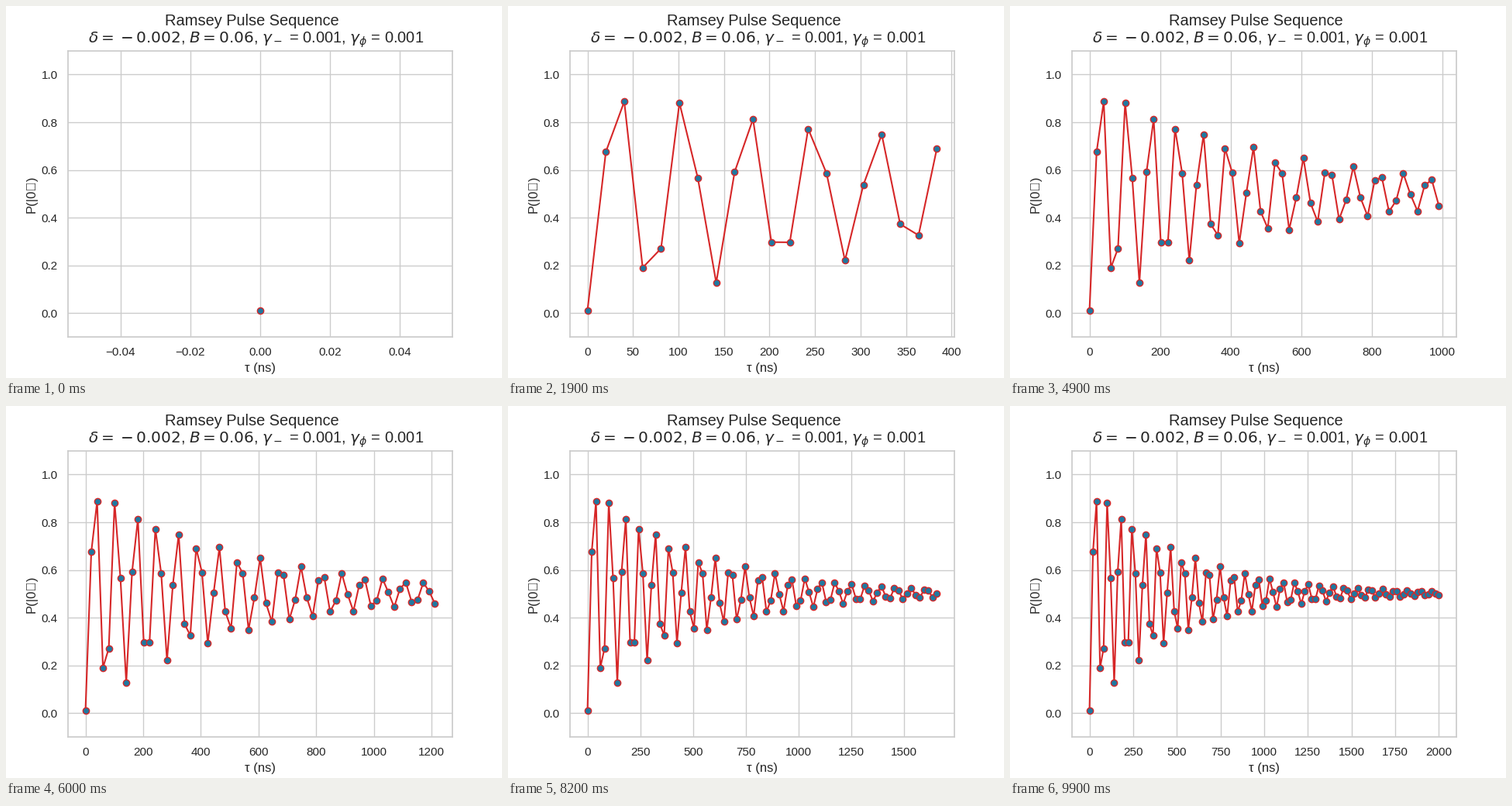
A matplotlib script that plays this animation: 640 by 480 pixels, repeating every 10 s.

```python
import numpy as np
import matplotlib.pyplot as plt
from matplotlib.animation import FuncAnimation

GRID, INK = "0.8", "0.15"

plt.rcParams.update({
    "font.family": "sans-serif",
    "font.sans-serif": ["Liberation Sans", "DejaVu Sans"],
    "font.size": 12,
    "figure.titlesize": 14.4,
    "text.color": INK,
    "axes.labelcolor": INK,
    "axes.labelsize": 12,
    "axes.edgecolor": GRID,
    "axes.linewidth": 1.25,
    "axes.axisbelow": True,
    "axes.grid": True,
    "grid.color": GRID,
    "grid.linewidth": 1,
    "lines.solid_capstyle": "round",
    "mathtext.fontset": "dejavusans",
})
for axis, side in (("xtick", "bottom"), ("ytick", "left")):
    plt.rcParams.update({
        f"{axis}.{side}": False,
        f"{axis}.color": INK,
        f"{axis}.labelsize": 11,
        f"{axis}.major.size": 6,
        f"{axis}.major.pad": 3.5,
    })

STEPS = 100
tau = np.linspace(0, 2000, STEPS)
# Damped Ramsey fringes around one half
prob = 0.5025 - 0.4975 * np.exp(-0.002 * tau) * np.cos(0.088 * tau + 0.165)

fig, ax = plt.subplots(figsize=(6.4, 4.8), dpi=100)
fig.suptitle(
    "Ramsey Pulse Sequence \n"
    r" $\delta = \hspace{0.2}{-}\hspace{0.2}0.002$, $B = 0.06$, "
    r"$\gamma_-$ = 0.001, $\gamma_\phi$ = 0.001"
)
ax.set_xlabel("τ (ns)")
ax.set_ylabel("P(|0⟩)")
ax.set_ylim(-0.1, 1.1)
line, = ax.plot([], [], "o-", color="tab:red", lw=1.5, ms=6, mew=1,
                mfc="#2078a0")


def update(i):
    line.set_data(tau[:i + 1], prob[:i + 1])
    ax.relim()
    ax.autoscale_view(scaley=False)
    return line,


anim = FuncAnimation(fig, update, frames=STEPS, interval=100,
                     repeat=True, repeat_delay=0)
plt.show()
```
